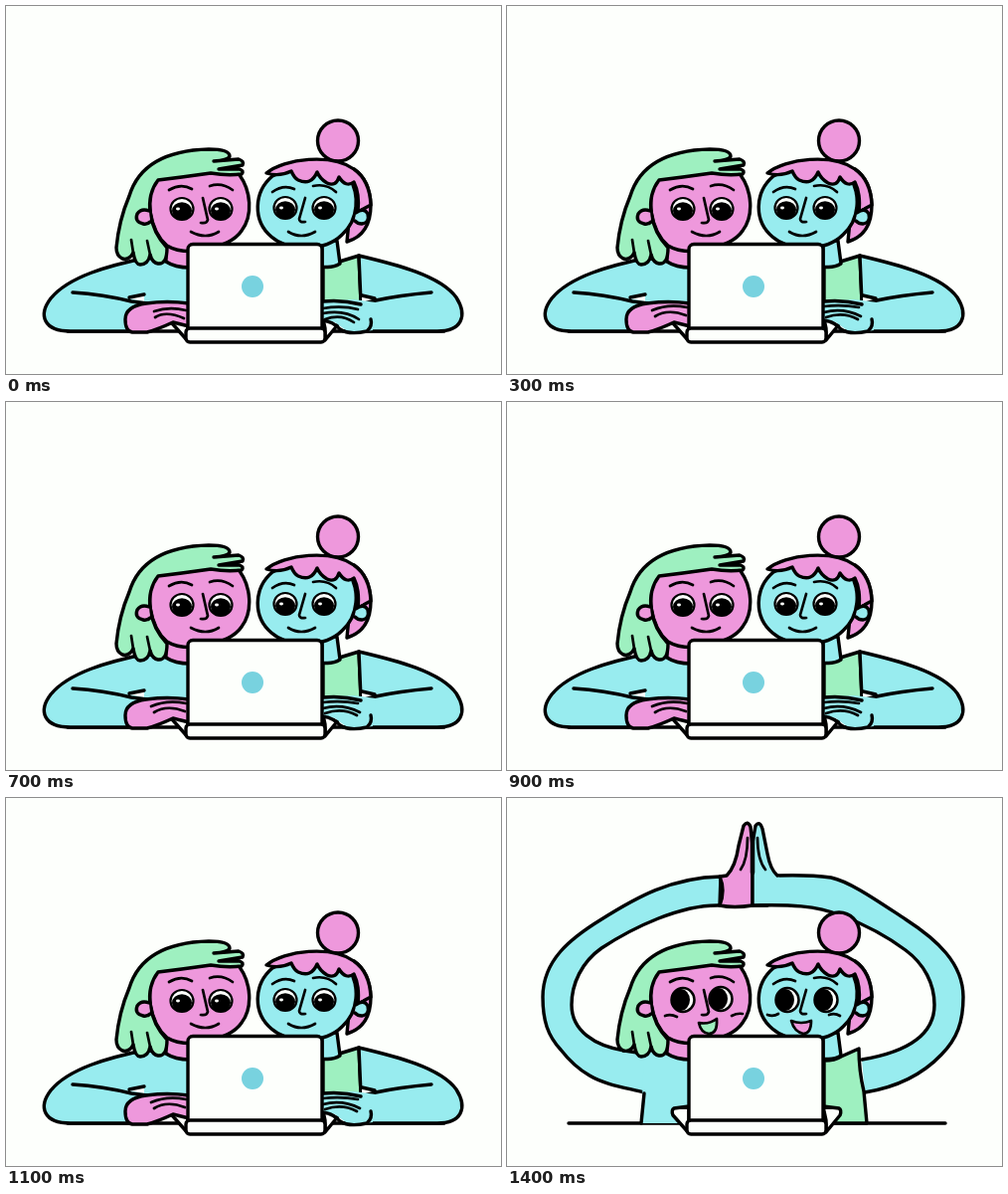
These frames come from a looping animation (498 by 370 pixels, 1500 ms). An HTML page:

```html
<!DOCTYPE html>
<html lang="en">
<head>
<meta charset="utf-8">
<title>High five</title>
<style>
  html, body { margin: 0; width: 100%; height: 100%; overflow: hidden; background: #fdfffc; }
  svg { display: block; width: 498px; height: 370px; stroke: #000; stroke-width: 3.4; stroke-linecap: round; stroke-linejoin: round; fill: none; }
  .cyan { fill: #98ecef; }
  .pink { fill: #ee98dc; }
  .green { fill: #9ef0c0; }
  .white { fill: #fdfffc; }
  .thin { stroke-width: 2.7; }
  .bare { stroke: none; }
  .ink { fill: #000; stroke: none; }
</style>
</head>
<body>
<svg viewBox="0 0 498 370">
  <defs>
    <g id="down">
      <ellipse class="white" rx="11.5" ry="11" stroke-width="2.2"/>
      <ellipse class="ink" cy="2" rx="10" ry="8.8"/>
      <ellipse class="white bare" cx="-4" cy="0" rx="2" ry="1.4"/>
    </g>
    <g id="wide">
      <ellipse class="white" rx="11.5" ry="12" stroke-width="2.5"/>
      <ellipse class="ink" cx="-2.5" rx="9.5" ry="11"/>
    </g>
    <path id="closed" d="M-12 1Q-10 9 0 9Q10 9 12 0M-12 -2Q0 -9 12 -2"/>
  </defs>

  <path d="M62 327H441"/>

  <!-- Raised arms -->
  <g data-show="high">
    <path class="cyan" d="M138 296C118 291 98 288 83 279C69 271 61 262 54 253C41 239 36 224 36 200C36 163 64 141 95 122C130 100 165 80 215 79L214 108C175 107 127 130 95 151C75 165 65 187 65 208C65 234 88 249 118 254L145 258"/>
    <path class="cyan" d="M360 296C391 291 418 278 437 258C453 242 459 225 459 200C459 166 432 142 401 122C372 103 345 84 326 80Q304 77 272 78L247 108C285 107 310 108 336 118C362 128 381 138 401 153C420 167 430 187 430 208C430 243 393 257 357 263"/>
    <path class="pink" d="M214 79L221 78C228 71 231 62 233 48L238 28Q242 22 245 29L247 48V108Q228 111 214 108Q220 93 214 79Z"/>
    <path class="cyan bare" d="M247 107V45L250 28Q254 22 257 31L262 56Q265 72 272 79L280 83L262 105Z"/>
    <path d="M247 108V45L250 28Q254 22 257 31L262 56Q265 72 272 78M247 108H262"/>
    <path d="M247 36V75" stroke-width="4.5"/>
    <path class="thin" d="M235 72Q242 62 242 40M260 72Q252 62 252 40"/>
    <path class="cyan bare" d="M138 252H185V327H135Z"/>
    <path class="green" d="M319 264Q330 264 336 260L354 252Q354 274 359 295L362 327H319Z"/>
    <path d="M138 297L135 327"/>
  </g>

  <!-- Resting arms -->
  <g data-show="type">
    <path class="cyan" d="M142 253C103 261 63 272 45 294C32 311 38 327 65 327H126L185 310V255Z"/>
    <path class="green" d="M319 262L355 251L357 298L319 302Z"/>
    <path class="cyan" d="M355 251C393 260 437 271 453 293C465 312 458 327 434 327H345L330 302L357 298Z"/>
    <path class="white bare" d="M124 294L139 289V297ZM358 291L374 294L358 298Z"/>
    <path d="M67 288Q98 290 126 297L142 299M124 293L139 290M428 288Q395 291 372 296L357 300M358 291L371 294"/>
  </g>

  <!-- Left head -->
  <path class="pink" d="M161 236V257Q170 263 185 263V236Z"/>
  <path class="pink" d="M152 174Q194 150 235 170C246 185 249 210 237 226C225 244 182 253 162 241C144 225 139 191 152 174Z"/>
  <path class="green" d="M111 243C113 222 118 205 124 191C134 158 163 145 204 144Q225 144 225 151Q224 155 209 156L234 154Q240 156 238 160L214 164L235 164Q240 166 237 169Q223 171 206 168Q178 172 153 175C139 193 143 223 162 243Q162 260 153 259Q147 258 145 250Q143 260 135 260Q130 260 128 248Q124 256 117 254Q111 251 111 243Z"/>
  <path class="thin" d="M128 248L126 235M145 250L142 236"/>
  <path class="pink" d="M144 206Q136 203 132 209Q129 217 138 219Q142 220 145 217"/>
  <path class="thin" d="M164 185Q176 178 187 184M205 181Q217 177 228 185M198 193L203 215Q202 219 196 218"/>

  <!-- Right head -->
  <path class="cyan" d="M318 236V262Q328 264 336 259L333 236Z"/>
  <circle class="pink" cx="334" cy="135.500" r="20.500"/>
  <path class="pink" d="M350 164Q366 175 367 200Q367 230 343 237Z"/>
  <path class="cyan" d="M268 171Q306 151 345 172C356 189 355 215 338 230C321 247 284 247 267 232C248 216 249 187 268 171Z"/>
  <path class="pink" d="M262 168C280 153 328 148 350 164Q366 175 367 200L354 207Q356 189 350 177Q342 183 335 172Q332 182 323 178Q316 174 313 167Q307 181 294 175Q290 173 287 166Q275 172 262 168Z"/>
  <path class="cyan" d="M352 208Q360 202 364 209Q366 218 358 219Q354 219 351 216"/>
  <path class="thin" d="M268 187Q279 179 290 184M309 181Q322 178 332 187M301 193L295 214Q295 218 301 217"/>

  <!-- Expressions -->
  <g data-show="type">
    <g data-show="open">
      <use href="#down" x="177" y="204"/>
      <use href="#down" x="216" y="204"/>
    </g>
    <g data-show="blink" class="thin">
      <use href="#closed" x="177" y="204"/>
      <use href="#closed" x="216" y="204"/>
    </g>
    <use href="#down" x="281" y="203"/>
    <use href="#down" x="320" y="203"/>
    <path class="thin" d="M186 227Q201 235 214 227M284 227Q297 235 311 227"/>
  </g>
  <g data-show="high">
    <use href="#wide" x="177" y="203"/>
    <use href="#wide" x="215" y="202"/>
    <use href="#wide" x="282" y="203"/>
    <use href="#wide" x="321" y="203"/>
    <g class="thin">
      <path class="green" d="M193 226Q203 228 211 222Q212 237 203 237Q195 236 193 226Z"/>
      <path class="pink" d="M286 224Q296 228 306 224Q306 237 298 237Q289 235 286 224Z"/>
      <path d="M159 219Q165 217 171 220M226 219Q232 216 237 217M262 218Q268 220 273 217M324 218Q330 216 335 219"/>
    </g>
  </g>

  <!-- Laptop and hands -->
  <path class="white" d="M183 310L168 312Q165 314 167 319L183 337V324ZM318 310L334 312Q337 314 335 319L321 336V324Z"/>
  <g data-show="type">
    <path class="pink" d="M141 299Q162 296 184 299V322L168 318Q153 325 142 328H127Q120 327 120 315Q120 302 141 299Z"/>
    <path class="cyan bare" d="M317 297L350 295L372 298L369 326L346 329L331 318L318 315Z"/>
    <path d="M357 300Q338 295 319 297M318 316Q329 317 336 325Q345 331 363 327Q369 322 367 315"/>
    <path class="thin" data-show="even" d="M149 307Q164 302 181 306M150 313Q161 306 179 314M319 304Q338 301 354 305M319 309Q340 305 355 315M321 315Q337 309 350 318"/>
    <path class="thin" data-show="odd" d="M146 306Q162 299 181 303M149 312Q162 304 180 311M319 302Q337 300 354 303M319 308Q338 303 356 312M321 313Q338 307 353 315"/>
  </g>
  <rect class="white" x="183" y="239.500" width="135" height="89" rx="5"/>
  <rect class="white" x="181" y="324" width="140" height="14" rx="4"/>
  <circle cx="248" cy="282" r="11" fill="#78d2df" stroke="none"/>

  <path class="thin" data-show="burst" d="M212 13L219 30M208 40L213 42M270 24L274 19M276 35L304 19M283 50L294 48M232 132L238 126M249 127L246 150"/>
</svg>
<script>
  const STEP = 100, STEPS = 15;
  const parts = document.querySelectorAll('[data-show]');

  function draw() {
    const step = Math.floor(performance.now() / STEP) % STEPS;
    const high = step >= 12, blink = step === 2, odd = step % 2 === 1;
    const state = { high, type: !high, blink, open: !blink, odd, even: !odd, burst: high && step < 14 };
    for (const part of parts) part.style.display = state[part.dataset.show] ? '' : 'none';
    requestAnimationFrame(draw);
  }
  draw();
</script>
</body>
</html>
```
